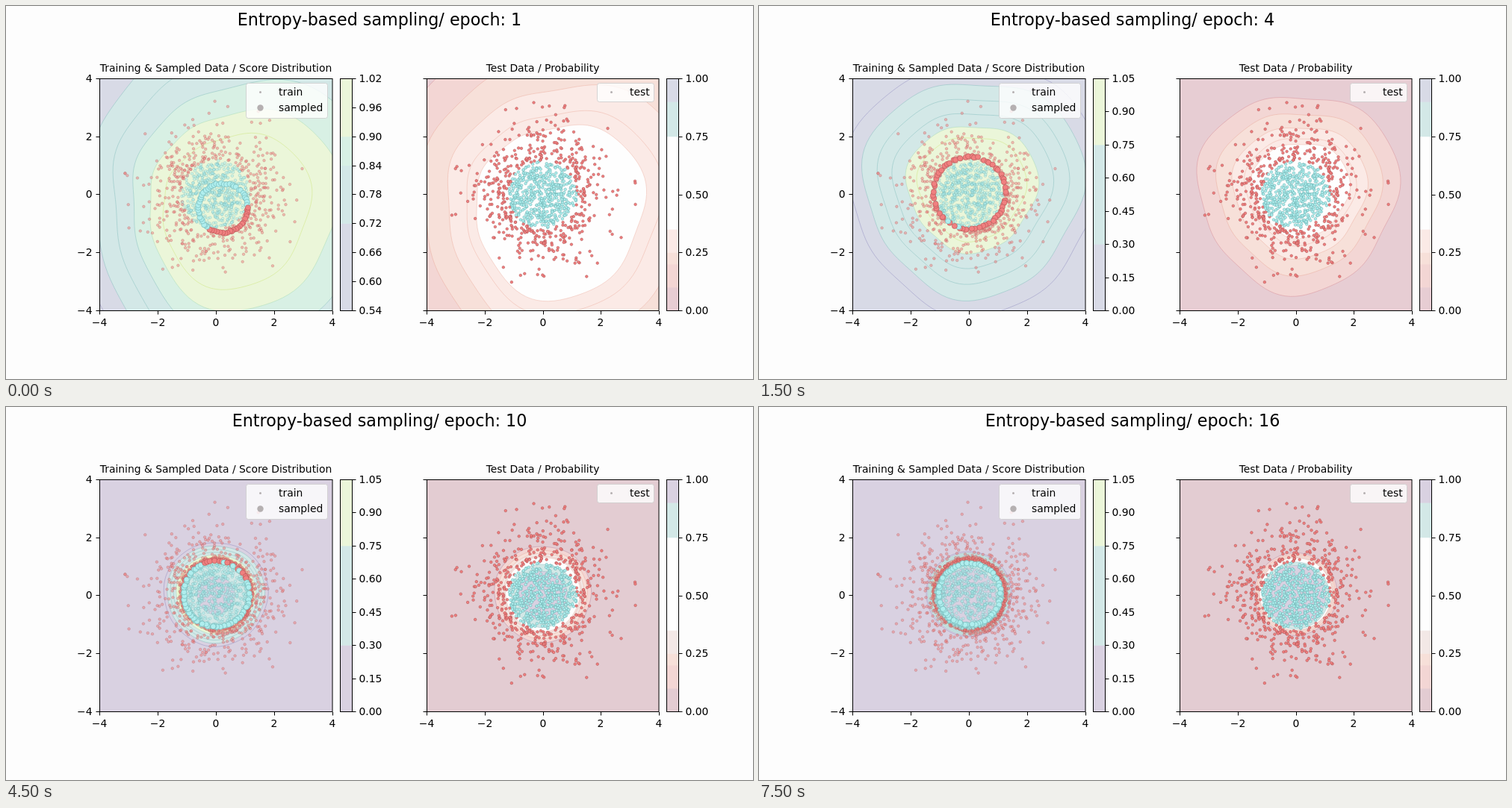
An HTML page with a canvas that plays this animation: 1000x500 px, repeating every 8000 ms.

```html
<!DOCTYPE html>
<html lang="en">
<head>
<meta charset="utf-8">
<title>Entropy-based sampling</title>
<style>
html, body { margin: 0; width: 100%; height: 100%; overflow: hidden; background: #fdfdfd; }
canvas { display: block; width: 1000px; height: 500px; }
</style>
</head>
<body>
<canvas id="stage" width="1000" height="500"></canvas>
<script>
const ctx = document.getElementById('stage').getContext('2d');
const TAU = Math.PI * 2, UNIT = 39, TOP = 97, HEIGHT = 311, MID_Y = 252.5;
const CLASS_RADIUS = 1.177 * UNIT;
const EPOCHS = 16, EPOCH_MS = 500;
const LEFT = { x: 125, width: 312, mid: 281 };
const RIGHT = { x: 563, width: 311, mid: 718.5 };

const TEAL = '#d3e8e7', MINT = '#d8f0e4', LIME = '#ebf6d9', WHITE = '#fefefe';
const FONT = '"DejaVu Sans", sans-serif';

const lerp = (a, b, f) => a + (b - a) * f;

function seededRandom(seed) {
  return () => {
    seed = (seed + 0x6D2B79F5) | 0;
    let t = Math.imul(seed ^ (seed >>> 15), 1 | seed);
    t = (t + Math.imul(t ^ (t >>> 7), 61 | t)) ^ t;
    return ((t ^ (t >>> 14)) >>> 0) / 4294967296;
  };
}

// Standard normal cloud around the middle of a plot.
function cloud(seed, midX) {
  const random = seededRandom(seed);
  return Array.from({ length: 1000 }, () => {
    const r = Math.min(3.2, Math.sqrt(-2 * Math.log(1 - random()))) * UNIT;
    const a = random() * TAU;
    return { x: midX + r * Math.cos(a), y: MID_Y + r * Math.sin(a) };
  });
}

// The sampled ring drifts onto the class border, then swings across it.
function sampledRing(epoch) {
  const f = Math.min(1, (epoch - 1) / 2);
  const x = lerp(290.5, 282, f), y = lerp(271, 250.5, f);
  const radius = epoch <= 3 ? lerp(33, 47, f) : 45.3 - 4 * Math.cos(TAU * 0.3 * (epoch - 6));
  const random = seededRandom(70 + epoch);
  return Array.from({ length: 60 }, (_, i) => {
    const a = (i + random()) * TAU / 60, r = radius + (random() - 0.5) * 2;
    return { x: x + r * Math.cos(a), y: y + r * Math.sin(a) };
  });
}

const trainPoints = cloud(11, LEFT.mid), testPoints = cloud(29, RIGHT.mid);
const rings = Array.from({ length: EPOCHS }, (_, i) => sampledRing(i + 1));

// An outline is a wobbly circle: radius, then its shift to the right and downwards.
// Each surface opens with outlines for epochs 1 and 3 and shrinks to a circle from epoch 6.
const score = {
  count: 6, power: 1.15,
  inner: [[98, 29, 22], [79, 6, -14]],
  outer: [[286, 94, 7], [200, 11, -15]],
  final: 54, spread: 48, rate: 0.28,
  holes: late => [46 - 20 * Math.exp(-0.4 * late), 40 - 40 * Math.exp(-0.25 * late)]
};
const probability = {
  count: 5, power: 1.5,
  inner: [[113, 24, 22], [69, 10, -10]],
  outer: [[260, 60, 15], [156, 5, -5]],
  final: 53, spread: 34, rate: 0.27,
  holes: late => [45 - 20 * Math.exp(-0.5 * late), 41 - 41 * Math.exp(-0.4 * late)]
};

function outlineAt(early, lateRadius, epoch) {
  const [first, third] = early;
  const late = [lateRadius, 0, -2];
  return epoch <= 3
    ? first.map((v, i) => lerp(v, third[i], (epoch - 1) / 2))
    : third.map((v, i) => lerp(v, late[i], Math.min(1, (epoch - 3) / 3)));
}

function contoursAt(surface, epoch) {
  const late = Math.max(0, epoch - 6);
  const inner = outlineAt(surface.inner, 48 + 5 * Math.exp(-0.25 * late), epoch);
  const outer = outlineAt(surface.outer, surface.final + surface.spread * Math.exp(-surface.rate * late), epoch);
  return Array.from({ length: surface.count }, (_, i) => {
    const t = (1 - i / (surface.count - 1)) ** surface.power;
    return inner.map((v, j) => lerp(v, outer[j], t));
  });
}

function blobPath(midX, [radius, right, down], wobble) {
  ctx.beginPath();
  for (let s = 0; s < 120; s++) {
    const a = s / 120 * TAU, cos = Math.cos(a), sin = Math.sin(a);
    const bumps = 1 + wobble * (Math.sin(3 * a) + 0.35 * Math.sin(7 * a + 1));
    const r = (radius + right * cos - down * sin) * bumps;
    ctx.lineTo(midX + r * cos, MID_Y - r * sin);
  }
  ctx.closePath();
}

function drawSurface(plot, surface, epoch, fills, lines, holeFills) {
  const wobble = 0.05 * Math.exp(-0.2 * Math.max(0, epoch - 4));
  const paint = (outline, fill, line) => {
    blobPath(plot.mid, outline, wobble);
    ctx.fillStyle = fill;
    ctx.fill();
    ctx.strokeStyle = line;
    ctx.stroke();
  };
  ctx.save();
  ctx.beginPath();
  ctx.rect(plot.x, TOP, plot.width, HEIGHT);
  ctx.clip();
  ctx.fillStyle = fills[0];
  ctx.fillRect(plot.x, TOP, plot.width, HEIGHT);
  ctx.lineWidth = 0.6;
  contoursAt(surface, epoch).forEach((outline, i) => paint(outline, fills[i + 1], lines[i]));
  if (epoch >= 6) {
    surface.holes(epoch - 6).forEach((r, i) => paint([r, 0, 0], holeFills[i], 'rgba(100,170,175,.5)'));
  }
  ctx.restore();
}

function drawDots(points, midX, radius, alpha) {
  ctx.globalAlpha = alpha;
  ctx.lineWidth = 0.5;
  for (const { x, y } of points) {
    const inside = Math.hypot(x - midX, y - MID_Y) < CLASS_RADIUS;
    ctx.fillStyle = inside ? '#afeeee' : '#f08080';
    ctx.strokeStyle = inside ? '#62a8a8' : '#a84c4c';
    ctx.beginPath();
    ctx.arc(x, y, radius, 0, TAU);
    ctx.fill();
    ctx.stroke();
  }
  ctx.globalAlpha = 1;
}

function text(string, x, y, align = 'left', size = 13.89) {
  ctx.font = `${size}px ${FONT}`;
  ctx.textAlign = align;
  ctx.fillStyle = '#000';
  ctx.fillText(string, x, y);
}

function line(x1, y1, x2, y2) {
  ctx.beginPath();
  ctx.moveTo(x1, y1);
  ctx.lineTo(x2, y2);
  ctx.stroke();
}

function drawAxes({ x, width, mid }, title, withLabels) {
  ctx.strokeStyle = '#000';
  ctx.lineWidth = 1;
  ctx.strokeRect(x + 0.5, TOP + 0.5, width - 0.5, HEIGHT);
  for (let i = 0; i < 5; i++) {
    const value = i * 2 - 4, label = (value < 0 ? '\u2212' : '') + Math.abs(value);
    const tickX = x + Math.round(i * width / 4), tickY = TOP + HEIGHT - Math.round(i * HEIGHT / 4);
    line(tickX + 0.5, TOP + HEIGHT + 1, tickX + 0.5, TOP + HEIGHT + 5.5);
    line(x - 4.5, tickY + 0.5, x, tickY + 0.5);
    text(label, tickX, 429, 'center');
    if (withLabels) text(label, x - 9.5, tickY + 5, 'right');
  }
  text(title, mid, 88, 'center');
}

// Bands are [upper value, colour] from the bottom upwards.
function drawColorbar(x, low, high, step, bands) {
  const toY = v => TOP + HEIGHT * (high - v) / (high - low);
  let from = low;
  for (const [upper, color] of bands) {
    ctx.fillStyle = color;
    ctx.fillRect(x, toY(upper), 16, toY(from) - toY(upper) + 0.5);
    from = upper;
  }
  ctx.strokeStyle = '#000';
  ctx.lineWidth = 1;
  ctx.strokeRect(x + 0.5, TOP + 0.5, 16, HEIGHT);
  for (let v = low; v < high + step / 2; v += step) {
    const y = Math.round(toY(v));
    line(x + 17, y + 0.5, x + 21.5, y + 0.5);
    text(v.toFixed(2), x + 25.5, y + 5);
  }
}

function drawLegend(x, width, height, entries) {
  ctx.beginPath();
  ctx.roundRect(x + 0.5, 103.5, width, height, 3);
  ctx.fillStyle = 'rgba(255,255,255,.8)';
  ctx.fill();
  ctx.strokeStyle = 'rgba(204,204,204,.8)';
  ctx.lineWidth = 1;
  ctx.stroke();
  entries.forEach(([label, radius], i) => {
    const y = 115 + i * 21;
    ctx.fillStyle = '#b5b0b1';
    ctx.beginPath();
    ctx.arc(x + 19.5, y + 0.5, radius, 0, TAU);
    ctx.fill();
    text(label, x + 44, y + 5);
  });
}

function draw(epoch) {
  ctx.fillStyle = '#fdfdfd';
  ctx.fillRect(0, 0, 1000, 500);
  text(`Entropy-based sampling/ epoch: ${epoch}`, 500, 26, 'center', 22.22);

  const first = epoch === 1, early = epoch < 5;
  const lavender = early ? '#d8dae6' : '#d9d1e1';
  const tealLine = 'rgba(95,170,170,.55)', violetLine = 'rgba(110,105,175,.55)';
  drawSurface(LEFT, score, epoch,
    [lavender, lavender, TEAL, TEAL, first ? MINT : TEAL, LIME, LIME],
    [violetLine, tealLine, tealLine, tealLine, 'rgba(140,205,160,.55)', 'rgba(200,225,110,.7)'],
    [TEAL, lavender]);
  drawDots(trainPoints, LEFT.mid, 1.8, 0.5);
  rings.slice(0, epoch - 1).forEach(ring => drawDots(ring, LEFT.mid, 1.8, 0.5));
  drawDots(rings[epoch - 1], LEFT.mid, 3.6, 1);
  drawAxes(LEFT, 'Training & Sampled Data / Score Distribution', true);
  drawLegend(321, 109, 47, [['train', 1.5], ['sampled', 4.2]]);
  if (first) {
    drawColorbar(447, 0.54, 1.02, 0.06, [[0.72, lavender], [0.84, TEAL], [0.9, MINT], [1.02, LIME]]);
  } else {
    drawColorbar(447, 0, 1.05, 0.15, [[0.3, lavender], [0.75, TEAL], [1.05, LIME]]);
  }

  const rose = early ? '#e7cdd3' : '#e3ccd2', pale = early ? '#fbeae6' : '#f3e8e6';
  const pink = '#f3d6d4', peach = '#f7e0d9', redLine = 'rgba(225,130,110,.45)';
  drawSurface(RIGHT, probability, epoch,
    [rose, pink, peach, pale, pale, WHITE],
    [early ? 'rgba(200,100,115,.5)' : 'rgba(150,100,135,.55)', redLine, redLine, redLine, redLine],
    [TEAL, lavender]);
  drawDots(testPoints, RIGHT.mid, 1.8, 1);
  drawAxes(RIGHT, 'Test Data / Probability', false);
  drawLegend(791, 76, 25, [['test', 1.5]]);
  drawColorbar(884, 0, 1, 0.25, [
    [0.1, rose], [0.2, pink], [0.25, peach], [0.35, pale], [0.75, WHITE], [0.9, TEAL], [1, lavender]
  ]);
}

let shownEpoch = 0;
function tick() {
  const epoch = 1 + Math.floor(performance.now() / EPOCH_MS) % EPOCHS;
  if (epoch !== shownEpoch) draw(shownEpoch = epoch);
  requestAnimationFrame(tick);
}
tick();
</script>
</body>
</html>
```
